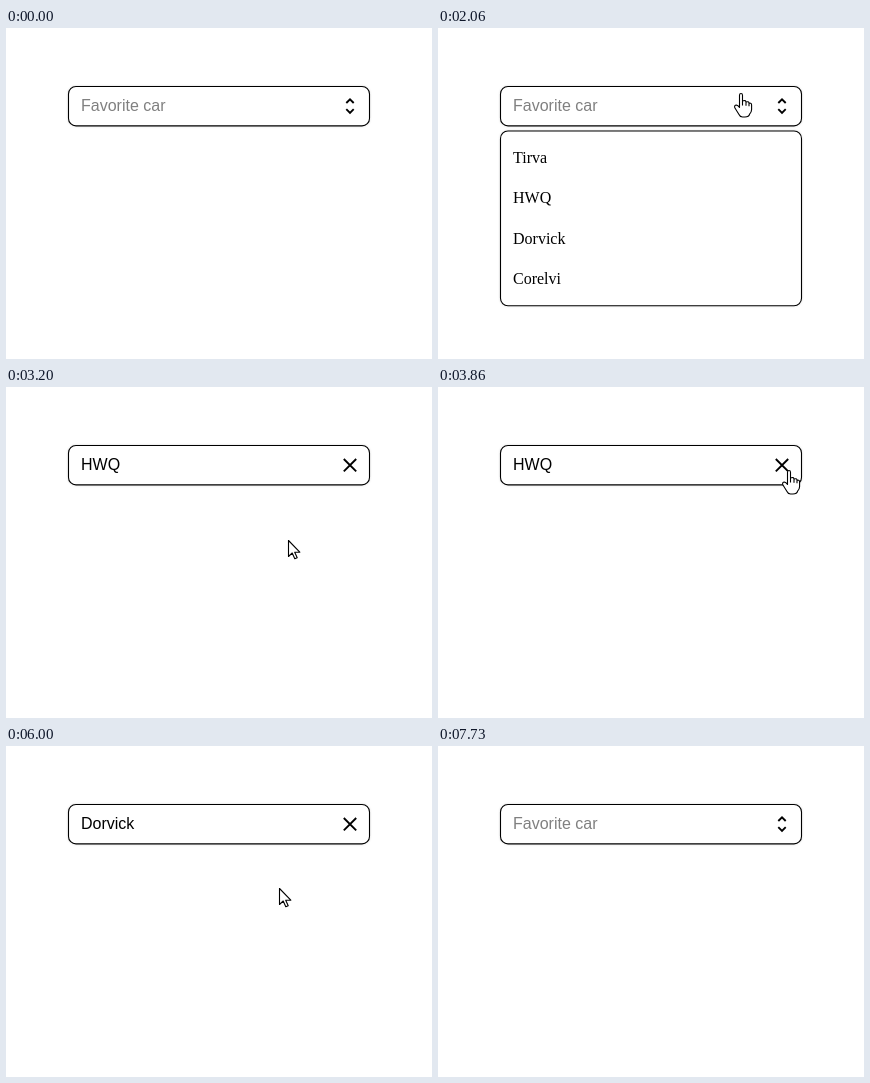
An HTML page for the animation above (9 s loop, 426 px wide and 331 px high).

```html
<!DOCTYPE html>
<html lang="en">
<head>
<meta charset="utf-8">
<title>Select box</title>
<style>
  html, body { margin: 0; width: 100%; height: 100%; overflow: hidden; background: #fff; }
  svg { display: block; }
  .box { fill: #fff; stroke: #000; stroke-width: 1.1; filter: drop-shadow(0 0 1px rgba(0, 0, 0, .15)); }
  .icon { fill: none; stroke: #000; stroke-width: 1.9; }
  #value { font: 16px "Liberation Sans", Arial, sans-serif; }
  #list text { font: 16px "Liberation Serif", "Times New Roman", serif; }
  #cursor path { fill: #fff; stroke: #000; stroke-width: 1.1; stroke-linejoin: round; }
</style>
</head>
<body>
<svg width="426" height="331" viewBox="0 0 426 331">
  <rect class="box" x="62.5" y="58.5" width="301" height="39.4" rx="7.5"/>
  <text id="value" x="75" y="83"></text>
  <path id="chevrons" class="icon" d="M340.3 75 344 71.3 347.7 75M340.3 81.2 344 84.9 347.7 81.2"/>
  <path id="clear" class="icon" d="M337.8 72 350.2 84.4M350.2 72 337.8 84.4"/>
  <g id="list">
    <rect class="box" x="62.5" y="103" width="301" height="174.8" rx="7.5"/>
  </g>
  <g id="cursor">
    <path id="arrow" d="M.5 .5V16.5L4.2 13 6.8 18.8 9.2 17.8 6.7 12.2H11.8Z"/>
    <path id="hand" d="M-1.5 14V2.2Q-1.5 .5 0 .5T1.5 2.2V8Q4.6 6.8 5 9Q7.8 8 8 10.2Q10.6 9.6 10.6 12V16.5Q10.6 19 8.6 21.2Q8 24 4 24H1.5Q-1 24 -2 21.5L-6.2 14.8Q-7 12 -4.6 12Q-3 12.2 -1.5 14.5ZM1.5 8V12.5M5 9V12.8M8 10.2V13.2"/>
  </g>
</svg>
<script>
const LOOP = 9000, STEP = 200 / 3;   // 15 steps per second
const ENTER = 20, EXIT = 116, REST_Y = 142, ROW = 40.4;
const OPTIONS = ["Tirva", "HWQ", "Dorvick", "Corelvi"];

// Each round: go to the field, open, pick an option, rest, clear (times in steps)
const ROUNDS = [
  { leave: 19, open: 31, pick: 42, clear: 61, option: 1, field: [303, 65], restX: 293, cross: [351, 83] },
  { leave: 64, open: 73, pick: 83, clear: 105, option: 2, field: [261, 76], restX: 273, cross: [346, 73] }
];

const $ = id => document.getElementById(id);
const show = (id, on) => $(id).setAttribute("visibility", on ? "visible" : "hidden");
const ease = u => u * u * (3 - 2 * u);

OPTIONS.forEach((name, i) => {
  const label = document.createElementNS("http://www.w3.org/2000/svg", "text");
  label.setAttribute("x", 75);
  label.setAttribute("y", 135 + i * ROW);
  label.textContent = name;
  $("list").append(label);
});

function cursorAt(step) {
  let x = 430, y = 10;
  const move = (from, to, [toX, toY], swing = 0) => {
    const u = Math.min(1, Math.max(0, (step - from) / (to - from)));
    const bend = swing * Math.sin(Math.PI * u) * (1 - u);
    x += (toX - x) * ease(u) - bend;
    y += (toY - y) * ease(u) + bend;
  };
  for (const r of ROUNDS) {
    move(r.leave, r.leave + 9, r.field);
    move(r.open, r.pick - 1, [r.restX, 130 + r.option * ROW]);
    move(r.pick, r.pick + 4, [r.restX, REST_Y]);
    move(r.clear - 14, r.clear - 3, r.cross, 50);
  }
  move(EXIT - 6, EXIT - 1, [344, 99]);
  return [Math.round(x), Math.round(y)];
}

function render(ms) {
  const step = Math.floor((ms % LOOP + 7) / STEP);
  const during = (from, to) => step >= from && step < to;
  const open = ROUNDS.some(r => during(r.open, r.pick));
  const chosen = ROUNDS.find(r => during(r.pick, r.clear));

  $("value").textContent = chosen ? OPTIONS[chosen.option] : "Favorite car";
  $("value").setAttribute("fill", chosen ? "#000" : "#808080");
  show("clear", chosen);
  show("chevrons", !chosen);
  show("list", open);

  const visible = during(ENTER, EXIT);
  const [x, y] = cursorAt(step);
  const hover = x > 62 && x < 364 && y > 58 && (y < 98 || open && y < 278);
  $("cursor").setAttribute("transform", `translate(${x} ${y})`);
  show("hand", visible && hover);
  show("arrow", visible && !hover);
}

const start = performance.now();
function tick() {
  render(performance.now() - start);
  requestAnimationFrame(tick);
}
tick();
</script>
</body>
</html>
```
